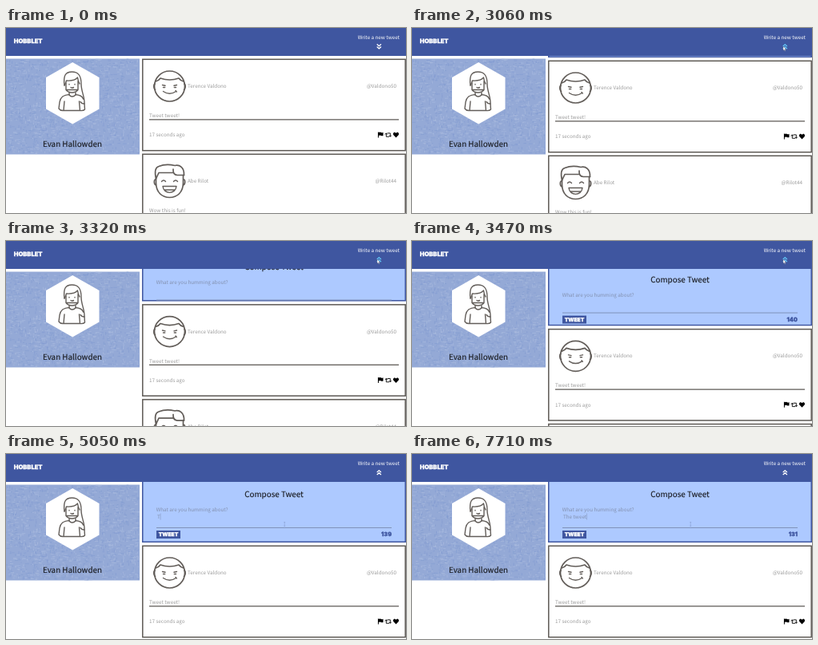
These frames come from a looping animation (500x232 px, 8 s). An HTML page:

```html
<!DOCTYPE html>
<html lang="en">
<head>
<meta charset="utf-8">
<title>Short message feed</title>
<style>
  html, body { margin: 0; width: 100%; height: 100%; overflow: hidden; background: #fff; }
  svg { display: block; }
  #stage { width: 100vw; height: 100vh; }
  text {
    font: 6.3px "Noto Sans CJK JP", "Noto Sans CJK SC", "Noto Sans CJK", "Open Sans", sans-serif;
    text-rendering: geometricPrecision; white-space: pre; fill: #9a9a9a;
  }
  .end { text-anchor: end; }
  .mid { text-anchor: middle; }
  .title { font-size: 9.85px; fill: #1b1d22; stroke: #1b1d22; stroke-width: .15; }
  .block { font-family: Inter, Roboto, sans-serif; font-weight: 900; fill: #fff; stroke: #fff; stroke-width: .3; }
  .soft { fill: #8290ae; }
  .line { fill: none; stroke: #625d59; stroke-width: 1.7; stroke-linecap: round; stroke-linejoin: round; }
  .thin { stroke-width: 1.4; }
  .chevrons { fill: none; stroke: #fff; stroke-width: 1.3; }
</style>
</head>
<body>
<svg id="stage" viewBox="0 0 500 232">
  <defs>
    <g id="icons">
      <path d="M464.9 130.4h1v.5q1.6-.9 3 0t2.6-.2v4.2q-1.4.8-2.7 0t-2.9.1v2.5h-1z"/>
      <path d="M475.3 132V136.300H479M480.300 136V131.900H476.600M473.900 133.500 475.300 131.800 476.700 133.500M478.900 134.700 480.300 136.400 481.700 134.700" fill="none" stroke="#000" stroke-width=".9"/>
      <path d="M487.5 137.4l-3.1-3.2c-1.6-2 1.3-4.9 3.1-2.3 1.8-2.6 4.7.3 3.1 2.3z"/>
    </g>
    <g id="frame">
      <rect x="170.8" y="39.3" width="328.4" height="114.4" fill="#fff" stroke="#5d5954" stroke-width="1.5"/>
      <path d="M179 114.800H491" stroke="#5d5954" stroke-width="1.3"/>
      <use href="#icons"/>
    </g>
  </defs>

  <g id="feed">
    <use href="#frame"/>
    <g class="line">
      <circle cx="204.500" cy="73" r="19"/>
      <path d="M187 67Q191 66 193 63Q204.500 67 216 63Q218 66 222 67"/>
      <path d="M186 70C184.300 71 184.300 76 186.500 77.500M223 70C224.700 71 224.700 76 222.500 77.500"/>
      <path class="thin" d="M195.500 71.500l3.500 .8M213.500 71.500l-3.500 .8M196.500 74.500h2.200M210.300 74.500h2.200M196.500 79.500Q204.500 85 212.500 79.500M212 78.500l1.300 1.500"/>
    </g>
    <text x="227" y="75">Terence Valdono</text>
    <text class="end" x="488" y="75">@Valdono50</text>
    <text x="179" y="112">Tweet tweet!</text>
    <text x="179" y="136.300">17 seconds ago</text>

    <use href="#frame" y="119"/>
    <g class="line">
      <path d="M187.500 189C186 182 185.500 175 191 173.500C197 171 205 171 211 172.500C217 171 223 175 222.500 184.500"/>
      <path d="M187.500 189L191 181.500H209M209 177Q208.500 184 214 184.500H222.500"/>
      <path d="M187.500 189V194C187.500 206 195 212.500 204.500 212.500S221.500 206 221.500 194V184.500"/>
      <path d="M187 190C184.700 190 184.700 196 187.500 197M222 190C224.300 190 224.300 196 221.500 197"/>
      <path class="thin" d="M194.500 192.500q2.500-3 5 0M209.500 192.500q2.500-3 5 0M196 198.500H213C212 209 197 209 196 198.500ZM198 203H211"/>
    </g>
    <text x="227" y="194">Abe Rilot</text>
    <text class="end" x="488" y="194">@Rilot44</text>
    <text x="179" y="231">Wow this is fun!</text>
  </g>

  <svg id="panel" x="170" y="20" width="330" height="0">
    <rect width="100%" height="100%" fill="#adc9ff" stroke="#3f56a0" stroke-width="3"/>
    <g id="form">
      <text class="title mid" x="335" y="54">Compose Tweet</text>
      <text class="soft" x="187.700" y="72">What are you humming about?</text>
      <text class="soft" id="draft" x="189" y="81"></text>
      <path id="caret" d="M0 74.500V82.500" stroke="#7f8fb2" stroke-width=".5"/>
      <path d="M188 92.500H482" stroke="#7f92b8" stroke-width="1"/>
      <rect x="188" y="96" width="30" height="10" fill="#3f56a0"/>
      <text class="block mid" x="203" y="103.400" style="font-size:6.700px">TWEET</text>
      <text class="block end" id="count" x="482" y="103.400" style="font-size:7.200px;fill:#3f56a0;stroke:#3f56a0"></text>
    </g>
  </svg>

  <rect y="38.500" width="167" height="120" fill="#94a9d6"/>
  <g id="weave" fill="none" stroke-width=".6"></g>
  <path d="M83.200 43 116.500 62V101.500L83.200 120.500 50 101.500V62Z" fill="#fff"/>
  <g class="line thin">
    <path d="M73 72C71.500 60 74 55 82.500 55C91 55 94 60 94 70C94 80 98.500 86 98 95Q95 95.500 93 92.500"/>
    <path d="M73 72Q75 68.500 75.500 66C82 66.500 87 65 89.500 62Q90 67 92 70"/>
    <path d="M75 69V77.500H90V67M75 77.500Q78 81 82.500 81T90 77.500"/>
    <path d="M79 70.500v.4M86 70.500v.4M81 74.500Q82.500 75.500 84.500 74.500M79 81V84Q82.500 88 87 84V81"/>
    <path d="M79 83.500C71 84 68 87 67 93L66 101Q68 104 72 103.500L73 92M72 103.500H92.500M87 83.500C93 84 95.500 86 96.500 89M91.500 92L92.500 103.500Q97 104 98.500 102L98 95"/>
  </g>
  <text class="title mid" x="83" y="149.300">Evan Hallowden</text>

  <rect width="500" height="35" fill="#3f56a0"/>
  <text class="block" x="9.700" y="19.300" style="font-size:7.600px">HOBBLET</text>
  <text class="end" x="492" y="14.200" style="fill:#fff">Write a new tweet</text>
  <path id="toggle" class="chevrons" d="M-2.600-2.900 0-.5 2.600-2.900M-2.600.2 0 2.600 2.600.2"/>
  <path id="arrow" d="M0 0V5.200L1.200 4.100 2 6 2.900 5.600 2.100 3.800H3.700Z" fill="#fff" stroke="#4d5675" stroke-width=".4"/>
  <path id="beam" d="M347.300 85.500h1.800M347.300 90.500h1.800M348.200 85.500v5" fill="none" stroke="#7f95c2" stroke-width=".5"/>
</svg>

<script>
const LOOP = 8000, OPEN = 3060, DROP = 76;
const $ = id => document.getElementById(id);
const show = (el, on) => el.setAttribute('visibility', on ? 'visible' : 'hidden');
const move = (el, x, y, extra = '') => el.setAttribute('transform', `translate(${x} ${y})${extra}`);

// Last entry whose time has passed
const at = (track, t) => track.filter(k => k[0] <= t).pop();

const slideTicks = [[0], [OPEN], [3190], [3320], [3470], [3590]];

// Time, x, y; no place means hidden
const pointer = [
  [0], [270, 71, 187], [400], [670, 73, 109], [800, 215, 11], [930],
  [1330, 424, 0], [1460, 433, 2], [1600, 441, 8], [1730, 450, 13], [1860, 457, 17],
  [2130, 460, 20], [2260, 462, 21], [2390, 463, 22], [2520, 464, 22], [2650, 464, 23],
  [3850, 455, 32], [3980, 420, 55], [4110, 375, 78], [4240, 348, 85], [4370]
];

const message = 'The tweet';
const typed = [[0, 0], [5050, 1], [5310, 2], [5440, 3], [5840, 4], [6640, 6], [6770, 8], [7710, 9]];
const caretOn = [[0, 0], [4630, 1], [6370, 0], [6640, 1], [7300, 0], [7710, 1]];

function weave() {
  let seed = 11;
  const rnd = () => (seed = seed * 16807 % 2147483647) / 2147483647;
  for (const [color, count] of [['#829bd0', 900], ['#abbce0', 900]]) {
    let d = '';
    for (let i = 0; i < count; i++) {
      const flat = rnd() < .6;
      const len = 1 + rnd() * (flat ? 4 : 3);
      const x = rnd() * (167 - (flat ? len : 0));
      const y = 39 + rnd() * (119 - (flat ? 0 : len));
      d += `M${x.toFixed(1)} ${y.toFixed(1)}${flat ? 'h' : 'v'}${len.toFixed(1)}`;
    }
    const path = document.createElementNS('http://www.w3.org/2000/svg', 'path');
    path.setAttribute('d', d);
    path.setAttribute('stroke', color);
    $('weave').append(path);
  }
}

function slide(t) {
  if (t < OPEN) return 0;
  const p = Math.min(1, Math.max(0, (at(slideTicks, t)[0] - 3075) / 470));
  return Math.max(2, DROP * (.5 - Math.cos(p * Math.PI) / 2));
}

function draw(t) {
  const drop = slide(t);
  move($('feed'), 0, drop);
  show($('panel'), drop > 0);
  $('panel').setAttribute('height', 15 + drop);
  move($('form'), -170, -20 - 39.5 * (1 - drop / DROP));

  const n = at(typed, t)[1];
  $('draft').textContent = message.slice(0, n);
  $('count').textContent = 140 - n;
  move($('caret'), 189.3 + (n ? $('draft').getComputedTextLength() : 0), 0);
  $('caret').setAttribute('opacity', at(caretOn, t)[1]);

  move($('toggle'), 466.3, 23.2, t < OPEN ? '' : ' scale(1 -1)');
  $('toggle').style.stroke = t >= OPEN && t < 4240 ? '#62c4f5' : '#fff';

  const [, x, y] = at(pointer, t);
  show($('arrow'), x !== undefined);
  if (x !== undefined) move($('arrow'), x, y);
  show($('beam'), t >= 4370);
}

function tick() {
  draw(performance.now() % LOOP);
  requestAnimationFrame(tick);
}

weave();
tick();
</script>
</body>
</html>
```
